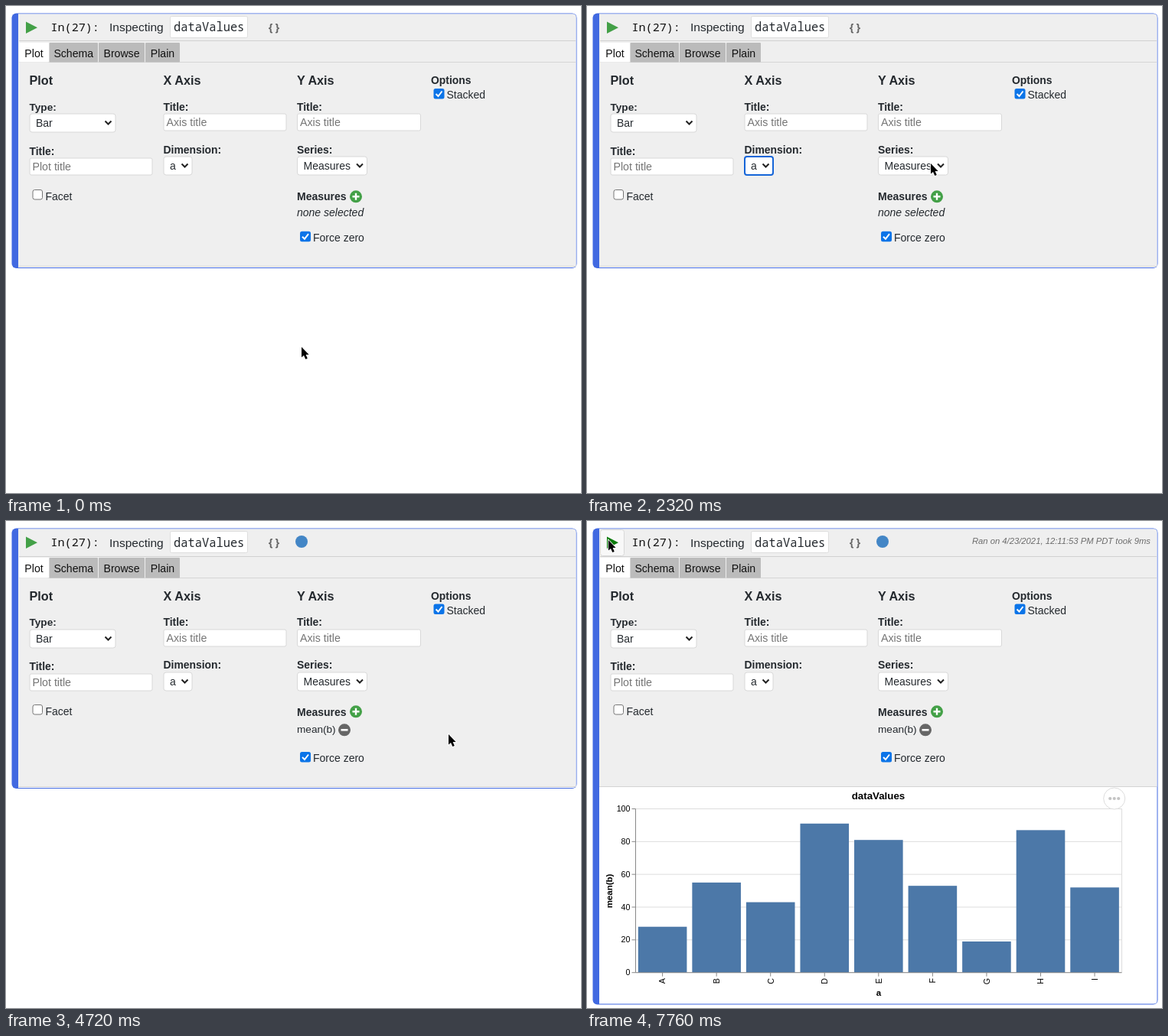
Recreate the animation shown at these times as an HTML page. Size 751 px wide and 637 px high, loop 9760 ms.

```html
<!DOCTYPE html>
<html lang="en">
<head>
<meta charset="utf-8">
<title>Plot inspector</title>
<style>
  html, body { margin: 0; width: 100%; height: 100%; overflow: hidden; background: #fff; }
  svg { display: block; font-family: "Liberation Sans", Arial, sans-serif; }
  .b { font-weight: bold; }
  .i { font-style: italic; }
  .m { font-family: "Noto Sans Mono", monospace; }
</style>
</head>
<body>
<svg width="751" height="637" viewBox="0 0 751 637">
  <g id="scene"></g>
  <path id="cursor" d="M0 0V13.6L3 10.9L5.3 16L7.8 14.9L5.6 10H9.6Z"
        stroke="#fff" stroke-width="1.6" paint-order="stroke"/>
</svg>
<script>
const LOOP = 9760, STEP = 80;
const INK = '#24292e', BLUE = '#4169e1', GREEN = '#43a047', DEEP = '#087a08';

// Pointer waypoints: time, x, y
const PATH = [
  [240, 386, 446], [1120, 241, 207], [1280, 241, 207], [1520, 233, 206],
  [1600, 233, 206], [2320, 449, 206], [2480, 449, 206], [2960, 456, 247],
  [3360, 456, 247], [3520, 488, 248], [3680, 488, 248], [3840, 495, 273],
  [4240, 495, 274], [4480, 578, 279], [5520, 578, 279], [6240, 28, 25]
];
const AGGREGATES = ['Mean', 'Sum', 'Count', 'Count distinct', 'Approx. count distinct', 'Median &amp; error'];
const BARS = { A: 28, B: 55, C: 43, D: 91, E: 81, F: 53, G: 19, H: 87, I: 52 };

const text = (x, y, str, size = 14, cls = '', fill = INK, more = '') =>
  `<text x="${x}" y="${y}" font-size="${size}" class="${cls}" fill="${fill}" ${more}>${str}</text>`;
const bold = (x, y, str, size = 13.9) => text(x, y, str, size, 'b');
const rect = (x, y, w, h, fill, stroke = 'none', r = 0, sw = 1) =>
  `<rect x="${x}" y="${y}" width="${w}" height="${h}" rx="${r}" fill="${fill}" stroke="${stroke}" stroke-width="${sw}"/>`;
const line = (d, stroke, width = 1) =>
  `<path d="${d}" fill="none" stroke="${stroke}" stroke-width="${width}"/>`;
const circle = (x, y, r, fill, stroke = 'none') =>
  `<circle cx="${x}" cy="${y}" r="${r}" fill="${fill}" stroke="${stroke}"/>`;

const input = (x, y, w, hint) =>
  rect(x + .5, y + .5, w, 22, '#fff', '#d8d8d8', 2) + text(x + 4, y + 16.5, hint, 14.2, '', '#757575');

function select(x, y, w, value, focus) {
  return rect(x + .5, y + .5, w, 24, '#fff', focus ? '#1565d8' : '#d8d8d8', 3, focus ? 2 : 1) +
    text(x + 8.5, y + 17, value) +
    line(`M${x + w - 13} ${y + 10}l4 4l4 -4`, '#222', 2);
}

function checkbox(x, y, on) {
  return on
    ? rect(x, y, 14, 13.5, '#0b74e8', 'none', 2.5) + line(`M${x + 3} ${y + 7}l3 3l5 -6.5`, '#fff', 2)
    : rect(x + .5, y + .5, 12.5, 12.5, '#fff', '#767676', 2.5);
}

function frame(bottom, s, plotted) {
  const split = plotted ? 347.5 : bottom - 1;
  return rect(7.5, 9.5, 738, bottom + 1 - 9.5, BLUE, 'none', 6) +
    `<path d="M16 10.5H740Q744.5 10.5 744.5 15V${bottom - 4.5}Q744.5 ${bottom} 740 ${bottom}H16Z" fill="#fff"/>` +
    `<path d="M16 10.5H740Q744.5 10.5 744.5 15V${split}H16Z" fill="#efefef"/>` +
    line(`M16 ${plotted ? 347.5 : bottom - 1.5}H744`, '#d4d4d4') +
    line(`M17 ${45.5 + s}H744`, '#c9c9c9', .8) + line(`M17 ${73.5 + s}H744`, '#d6d6d6');
}

function header(t, s) {
  const hover = t >= 6160, pressed = t >= 6480 && t < 6640;
  let out = hover
    ? rect(17.5, 11.5, 31, 34, pressed ? '#bdbdbd' : '#f8f8f8', pressed ? '#aaa' : '#d8d8d8', 3) : '';
  out += `<path d="M26 20.5V36L41 28.2Z" fill="${hover ? DEEP : GREEN}"/>`;
  out += text(58.5, 33, 'In(27):', 15.1, 'm', '#111') + text(135, 33 + s / 2, 'Inspecting', 15.5) +
    rect(214.5, 13.5, 101, 28, '#fff', '#ddd', 2) + text(219, 33 + s / 2, 'dataValues', 15.4, 'm') +
    text(341, 32.5, '{}', 15, 'm b', '#666');
  if (s) out += circle(386, 27, 8, '#4386c6');
  if (t >= 6640) {
    out += text(736, 30, 'Ran on 4/23/2021, 12:11:53 PM PDT took 9ms', 11.25, 'i', '#6c6c6c', 'text-anchor="end"');
  }
  [['Plot', 17, 39], ['Schema', 56.5, 63.5], ['Browse', 121, 60], ['Plain', 182, 45]].forEach(([name, x, w], i) => {
    out += rect(x, 48, w, 25.5 + s, i ? '#bbb' : '#fff', 'none', 1) +
      text(x + w / 2, 67, name, 14.1, '', '#111', 'text-anchor="middle"');
  });
  return out;
}

function form(t, s) {
  const plusHover = t >= 2880 && t < 4640, plus = plusHover ? DEEP : GREEN;
  let out =
    bold(30.5, 103 + s, 'Plot', 16.2) + bold(205.5, 103 + s, 'X Axis', 16.2) + bold(380, 103 + s, 'Y Axis', 16.2) +
    bold(555, 101.5 + s, 'Options') + checkbox(558.5, 108 + s / 2, true) + text(575.5, 121 + s, 'Stacked') +
    bold(30.5, 137, 'Type:', 13.6) + select(30.5, 140.5 + s, 112, 'Bar') +
    bold(30.5, 195, 'Title:') + input(30.5, 198.5 + s, 160, 'Plot title') +
    checkbox(34.5, 240, false) + text(51.5, 253.5, 'Facet') +
    bold(205.5, 137, 'Title:') + input(205.5, 140.5 + s, 160, 'Axis title') +
    bold(205.5, 192.5, 'Dimension:') + select(205.5, 196.5 + s, 37, 'a', t >= 1680 && t < 3040) +
    bold(380, 137, 'Title:') + input(380, 140.5 + s, 161, 'Axis title') +
    bold(380, 192.5, 'Series:') + select(380, 196.5 + s, 91, 'Measures') +
    bold(380, 253.5 + s, 'Measures', 14);
  if (plusHover) out += rect(446.5, 238.5, 21, 22, '#f8f8f8', '#ddd', 2);
  out += circle(457, 249.3, 8, plus) + line('M452.5 249.3h9M457 244.8v9', '#fff', 2.4);
  out += s
    ? text(380, 277, 'mean(b)', 13.6) + circle(442, 273.3, 8, '#666') + line('M437.5 273.3h9', '#fff', 2.6)
    : text(380, 274.5, 'none selected', 14, 'i');
  const y = s ? 302 : 294.7;
  return out + checkbox(384, y, true) + text(401, y + 13.3, 'Force zero');
}

function menuRow(x, y, w, label, active, arrow) {
  const ink = active ? '#fff' : INK;
  return (active ? rect(x, y, w, 27, BLUE) : '') + text(x + (arrow ? 7 : 13), y + 17.8, label, 12.7, '', ink) +
    (arrow ? `<path d="M${x + 25.5} ${y + 10}v7l4 -3.5z" fill="${ink}"/>` : '');
}

function submenu(y, items, active) {
  return rect(503.5, y + .5, 158, items.length * 27.3 - .5, '#fff', '#ccc', 3) +
    items.map((name, i) => menuRow(503.5, y + .5 + i * 27.25, 158, name, i === active)).join('');
}

function menus(t) {
  if (t < 3040 || t >= 4640) return '';
  const onA = t >= 3440 && t < 3760, onB = t >= 3760;
  let out = rect(468.5, 237.5, 35, 53, '#fff', '#ccc', 3) +
    menuRow(469, 237.5, 34, 'a', onA, true) + menuRow(469, 264, 34, 'b', onB, true);
  if (onA) out += submenu(237, AGGREGATES.slice(2, 5));
  if (onB) out += submenu(265, AGGREGATES, t >= 4320 ? 0 : -1);
  return out;
}

function chart() {
  const left = 63.5, base = 590.7, right = 698.5, unit = 2.142, step = (right - left) / 9;
  const label = (x, y, str, more) => text(x, y, str, 10.7, '', '#000', more);
  let out = text(380.5, 364, 'dataValues', 13.3, 'b', '#000', 'text-anchor="middle"');
  for (let v = 0; v <= 100; v += 20) {
    const y = base - v * unit;
    out += line(`M${left} ${y}H${right}`, '#ddd') + line(`M${left - 5} ${y}h5`, '#888') +
      label(56.5, y + 3.6, v, 'text-anchor="end"');
  }
  out += line(`M${right} ${base - 100 * unit}V${base}`, '#ddd');
  Object.entries(BARS).forEach(([name, v], i) => {
    const x = left + 3.3 + i * step, mid = x + 31.8;
    out += rect(x, base - v * unit, 63.6, v * unit, '#4c78a8') + line(`M${mid} ${base}v5`, '#888') +
      label(0, 0, name, `text-anchor="end" transform="translate(${mid + 3.8} 598) rotate(-90)"`);
  });
  out += line(`M${left} ${base - 100 * unit}V${base}H${right}`, '#888');
  out += text(381, 621, 'a', 11.5, 'b', '#000', 'text-anchor="middle"') +
    text(0, 0, 'mean(b)', 11.5, 'b', '#000', 'text-anchor="middle" transform="translate(33 484) rotate(-90)"');
  return out + circle(688.7, 363, 14, '#fff', '#ddd') +
    [-5.5, 0, 5.5].map(dx => circle(688.7 + dx, 363, 2.1, '#c4c4c4')).join('');
}

function scene(t) {
  const s = t >= 4640 ? 1 : 0, plotted = t >= 6640;
  const bottom = plotted ? 631.5 : s ? 349 : 342;
  return frame(bottom, s, plotted) + header(t, s) + form(t, s) + menus(t) + (plotted ? chart() : '');
}

function pointer(t) {
  const next = PATH.findIndex(p => p[0] > t);
  if (next === 0) return PATH[0].slice(1);
  if (next < 0) return PATH[PATH.length - 1].slice(1);
  const [t0, x0, y0] = PATH[next - 1], [t1, x1, y1] = PATH[next];
  const u = (t - t0) / (t1 - t0), k = u * u * (3 - 2 * u);
  return [x0 + (x1 - x0) * k, y0 + (y1 - y0) * k];
}

const sceneNode = document.getElementById('scene'), cursorNode = document.getElementById('cursor');
let shown = -1;
function draw(now) {
  const t = Math.floor(now % LOOP / STEP) * STEP;
  if (t !== shown) {
    shown = t;
    sceneNode.innerHTML = scene(t);
    cursorNode.setAttribute('transform', `translate(${pointer(t)})`);
  }
}
const start = performance.now();
function tick() {
  draw(performance.now() - start);
  requestAnimationFrame(tick);
}
tick();
</script>
</body>
</html>
```
